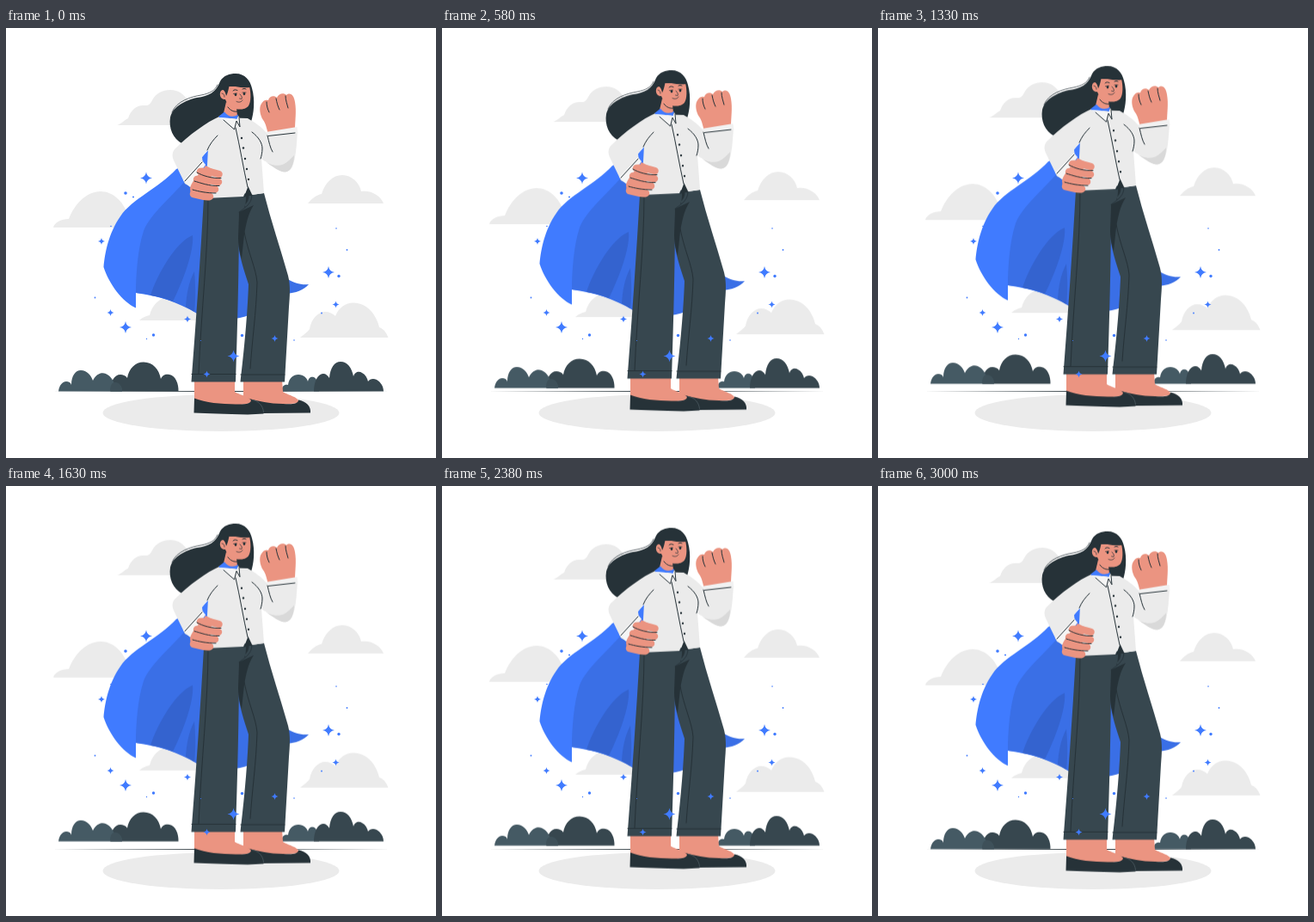
These frames come from a looping animation (500 by 500 pixels, 3040 ms). An HTML page:

```html
<!DOCTYPE html>
<html lang="en">
<head>
<meta charset="utf-8">
<title>Caped woman</title>
<style>
  html, body { margin: 0; width: 100%; height: 100%; overflow: hidden; background: #fff; }
  svg { display: block; width: 100vw; height: 100vh; }
  .float { animation: float 3040ms linear infinite; }
  @keyframes float {
    50% { transform: translateY(-10px); }
  }
  .grey { fill: #ebebeb; }
  .blue { fill: #407bff; }
  .blue2 { fill: #3a6fe6; }
  .blue3 { fill: #3463cf; }
  .dark { fill: #263238; }
  .slate { fill: #37474f; }
  .bush { fill: #455a64; }
  .skin { fill: #eb9481; }
  .ink { fill: none; stroke: #263238; stroke-width: 1; stroke-linecap: round; stroke-linejoin: round; }
  .thin { stroke-width: .7; }
</style>
</head>
<body>
<svg viewBox="0 0 500 500">
  <defs>
    <path id="star" d="M0,-7 Q.9,-.9 7,0 Q.9,.9 0,7 Q-.9,.9 -7,0 Q-.9,-.9 0,-7Z"/>
  </defs>

  <g class="float grey">
    <path d="M129,113 C134,112 137,107 142,105 C145,95 153,89 161,90 C165,90 167,90 170,84 C174,76 182,72 191,72 C201,72 207,77 211,84 L222,113Z"/>
    <path d="M55,232 C56,226 65,222 73,222 C80,204 94,190 110,190 C124,190 135,201 140,213 C144,206 151,201 160,201 L170,232Z"/>
    <path d="M351,204 C355,199 361,194 367,193 C371,180 380,171 391,171 C402,171 411,180 413,190 C424,188 436,195 439,204Z"/>
    <path d="M342,360 C346,357 351,353 353,350 C355,338 363,330 371,330 C376,330 380,332 383,335 C387,325 395,319.500 404,319.500 C420,319.500 431,334 434,348 C440,350 443,356 444.500,360Z"/>
    <path d="M155,340 C159,336 163,335 167,334 C170,322 178,314 190,312 H226 V340Z"/>
  </g>

  <ellipse class="grey" cx="250" cy="447.500" rx="137.500" ry="21.500"/>
  <path class="dark" d="M53,422.500 L250,422 L447,422.500 L250,423Z"/>

  <g class="float">
    <!-- bushes -->
    <path class="slate" d="M122,422.500 C121,411 126,403 133,403 C136,403 139,404 141,407 C143,396 150,388.500 160,388.500 C171,388.500 178,397 180,408 C182,403 186,402 190,403 C197,404 201,414 200.500,422.500Z"/>
    <path class="bush" d="M61,422.500 C62,415 66,411 70,411 C73,411 75,412 76,415 C76,404 81,398 87,398 C94,398 99,404 101,410 C105,402 111,400 116,402 C121,404 124,409 126,413 C131,412 135,416 135,422.500Z"/>
    <path d="M121,422.500 C121,416 123,412 127,412 C132,412 135,417 135,422.500Z" fill="#3e5059"/>
    <path class="bush" d="M320,422.500 C321,416 324,414 328,415 C329,407 334,403 340,403 C346,403 350,407 351,411 C352,406 355,405 358,406 C363,409 364,416 364,422.500Z"/>
    <path class="slate" d="M358,422.500 C358,411 363,401.500 369,402 C372,402 374,404 376,407 C377,395 382,388 389,388 C397,388 402,395 404,405 C406,399 411,399 414,401 C418,403 420,407 421,411 C423,408 427,407 431,409 C436,412 439,417 439,422.500Z"/>

    <!-- cape -->
    <path class="blue" d="M198,164 C178,186 146,199 133,219 C119,239 115,262 113.500,278 C120,298 135,318 151,325.500 V308 C180,312 205,320 222,331 L236,200 V141 L228,150Z"/>
    <path class="blue2" d="M209,177 C193,196 167,217 160,236 C153,257 151,288 151,308 C176,310 202,320 222,332 L232,198 L216,186Z"/>
    <path class="blue3" d="M217,241 C198,248 176,286 168,311 C177,312 185,314 194,318 C205,296 219,260 217,241Z"/>
    <path class="blue3" d="M219,283 C212,296 210,310 209,324 L219,330 C221,312 220,296 219,283Z"/>
    <path class="blue2" d="M266,245 H290 V330 C282,335 274,337 266,338Z"/>
    <path class="blue2" d="M326,291 C335,297 344,299 352,298 C346,305 337,308 326,309Z"/>

    <!-- feet -->
    <path class="skin" d="M276,409 H321 L322,423 C328,427 341,429 341,436 L300,440 L276,430Z"/>
    <path class="dark" d="M281,430.500 C294,434 306,437 322,437 C333,438 340,437 340,432.500 C349,434 355,440 354,447.500 L298,448Z"/>
    <path class="skin" d="M219,409 H266 V423 C272,427 286,429 286,436 L260,440 L219,435Z"/>
    <path class="dark" d="M219,430.500 C232,436 250,437 267,437.500 C278,438 285,437 285,432.500 C293,433 299,439 299.500,448.500 L281,449.500 C255,449 235,448 218.500,447.500Z"/>
    <path d="M286,432.500 C293,433 299,439 299.500,447" fill="none" stroke="#596870" stroke-width=".6"/>

    <!-- trousers -->
    <path class="slate" d="M271,196 L300,192 C308,224 319,256 328,288 C331,300 330,312 329,324 L324,411.500 H272.500 C277,375 281,330 282,298 C277,282 271,266 270,248Z"/>
    <path class="slate" d="M230,198 L281,192 L287,207 L271,214 C271,280 269,350 267,411.500 H215.500 C221,340 226,268 230,198Z"/>
    <path class="dark" d="M271,214 L288,206 C281,216 279,230 277,240 L274,268 C271,259 270,250 270,244Z"/>
    <path class="ink" d="M235,199 C235,260 227,330 224,402 M216,402.500 H267 M273,403 H324" stroke-width=".8"/>
    <path class="ink" d="M277,237 C281,260 291,280 292,296 C291,330 286,365 284,396"/>

    <!-- back hair -->
    <path class="dark" d="M249,62 C253,55 260,53 267,53 C278,53 284,61 286,70 C290,84 288,100 285,109 L250,104 C234,110 220,122 205,134.500 C194,129 189,116 191,104 C194,91 209,84 222,81 C236,79 244,75 249,62Z"/>
    <path class="ink thin" d="M193,98 C198,85 215,80 227,78 C237,76 243,73 246,66"/>

    <!-- shirt body and raised arm -->
    <path class="grey" d="M281,105 C290,110 297,115 304,123 L339,119 C338,136 337,152 333,161 C330,168 323,169 317,165 L297,152 L300,192 L286,194 L281,184 L276,196 L232,198 L235,140 L247,104Z"/>
    <path d="M297,152 C308,161 320,163 329,154 L335,148 C335,158 331,168 324,167.500 C316,167 306,158 297,152Z" fill="#d9d9d9"/>
    <path class="grey" d="M248,103 C234,109 213,124 196,141 C193,145 193,149 195,154 L208,181 L215,185 L229,159 L228,150 L248,124Z"/>
    <path d="M206,177 L228,154 L232,159 L214,185Z" fill="#f5f5f5"/>
    <path class="ink" d="M246,125 C241,130 237,135 234,142 M208,178 L228,156"/>
    <path class="ink" d="M286,121 C294,127 298,134 298,140 C298,145 297,149 296,152 M304,125 C306,133 307,139 310,144"/>
    <path class="ink" d="M267,116 C272,138 276,163 281,185" stroke-width=".8"/>
    <g class="dark">
      <circle cx="274" cy="128" r="1.200"/>
      <circle cx="276" cy="139.500" r="1.200"/>
      <circle cx="278" cy="152" r="1.200"/>
      <circle cx="280" cy="164" r="1.200"/>
      <circle cx="282" cy="176" r="1.200"/>
      <path d="M276.500,197 L281.500,184 L286,193.500 C285,200 283,205 277,209 C279,204 279,201 279,196Z"/>
    </g>
    <path d="M278,207 C282,204 284,199 284,195" fill="none" stroke="#37474f" stroke-width="3"/>
    <path class="ink thin" d="M286,194 C286,203 281,207 271,214"/>

    <!-- fist -->
    <path class="skin" d="M305,124 C303,116 302,111 299,107 C295,101 294,92 297,88 C299,84 302,83 305,84 C306,79 312,78 315,81 C317,76 323,75 326,78 C331,74 335,79 336,86 C338,97 336,108 336,119Z"/>
    <path class="ink" d="M303,86 C303,90 304,94 306,98 M314,82 C315,87 316,91 318,95 M325,79 C325,84 327,89 328,93" stroke-width=".8"/>
    <path d="M302,121 L338.500,115 L339.500,122 L305,125.500Z" fill="#f2f2f2"/>
    <path class="ink" d="M305,125.500 L336,122" stroke-width=".8"/>

    <!-- hand on hip -->
    <path class="skin" d="M232,160 C228,168 217,175 214,186 L215,196 L236,194 L240,164Z"/>
    <g fill="none" stroke="#eb9481" stroke-width="8.500" stroke-linecap="round">
      <path d="M226,167 C234,166 241,168 247.500,170"/>
      <path d="M222,176 C230,175 239,178 247,179"/>
      <path d="M220,185 C228,185 236,188 243,187.500"/>
      <path d="M218,193 C224,194 230,197 237,196"/>
    </g>
    <path class="ink" d="M222,168 C229,172 239,175 250,174.500 M219,178 C226,180 236,184 248,183.500 M217,188 C224,190 233,192 244,192" stroke-width="1.200"/>

    <!-- neck and collar -->
    <path class="skin" d="M256,86 L253,99 C257,105 265,106 269,102 L268,93Z"/>
    <path class="ink" d="M258,92 C261,96 265,98 270,97" stroke-width="1.500"/>
    <path class="blue" d="M247,103 L254,97.500 C258,103 264,104.500 270,100.500 L269,106 C262,104 257,105 254,108Z"/>
    <path d="M248,104 C255,104 262,105 268,107 L265.500,118 C260,114 255,109 248,104Z M268,107 L270,102 C273,106 273,110 272,115Z" fill="#f5f5f5"/>
    <path class="ink" d="M253,107 L265.500,118 L268,108 L272,115 L271,104" stroke-width=".8"/>

    <!-- head -->
    <path class="skin" d="M255,68 L283,68 C285,76 285,86 282,90.500 C279,95 270,95.500 265,93.500 C260,92 257,88 255,83 C250,84 247,77 250,73 C252,71 254,72 255,74Z"/>
    <path class="dark" d="M249,71 C250,59 258,54 267,54 C277,54 283,61 284,69 C275,70 266,69 260,65 C259,70 258,76 256,79 C255,73 252,70 249,71Z"/>
    <path class="ink thin" d="M251,76 C253,76 254,78 254,80 M272,77 C274,79 275,81 274,82.500 L271.500,82 M268,85.500 C271,87 274,86 275,84"/>
    <path class="ink" d="M264,73 C265,71.500 267,71.500 269,72.500 M275,71 C276,70.300 278,70.300 279,71"/>
    <path class="ink thin" d="M264.500,76.500 L268.500,76 M275,75 L279,75"/>
    <ellipse class="dark" cx="267" cy="77.500" rx="1.300" ry="1.800"/>
    <ellipse class="dark" cx="277" cy="76.500" rx="1.300" ry="1.800"/>
  </g>

  <g id="sparkles" class="blue"></g>
</svg>
<script>
  const stars = [
    [163, 174.5, 1], [139, 348, 1], [264.5, 381.5, 1], [375, 284, 1],
    [111, 248, .58], [121.5, 331, .58], [211, 338.5, .58],
    [233.5, 402.5, .58], [312.5, 361, .58], [383.5, 321.5, .58]
  ];
  const dots = [
    [139, 192, 1.8], [148, 196.5, 1], [122, 230.5, .8], [103.5, 313.5, .9],
    [171.5, 357, 1.7], [163.5, 361.5, .7], [226.5, 363.5, .6], [274.5, 357.5, 1.7],
    [335, 363, .8], [387, 288.5, 1.7], [396.5, 258, .9], [384, 233, .8], [367, 331.5, .9]
  ];
  document.getElementById('sparkles').innerHTML =
    stars.map(([x, y, s]) => `<use href="#star" transform="translate(${x} ${y}) scale(${s})"/>`).join('') +
    dots.map(([x, y, r]) => `<circle cx="${x}" cy="${y}" r="${r}"/>`).join('');
</script>
</body>
</html>
```
